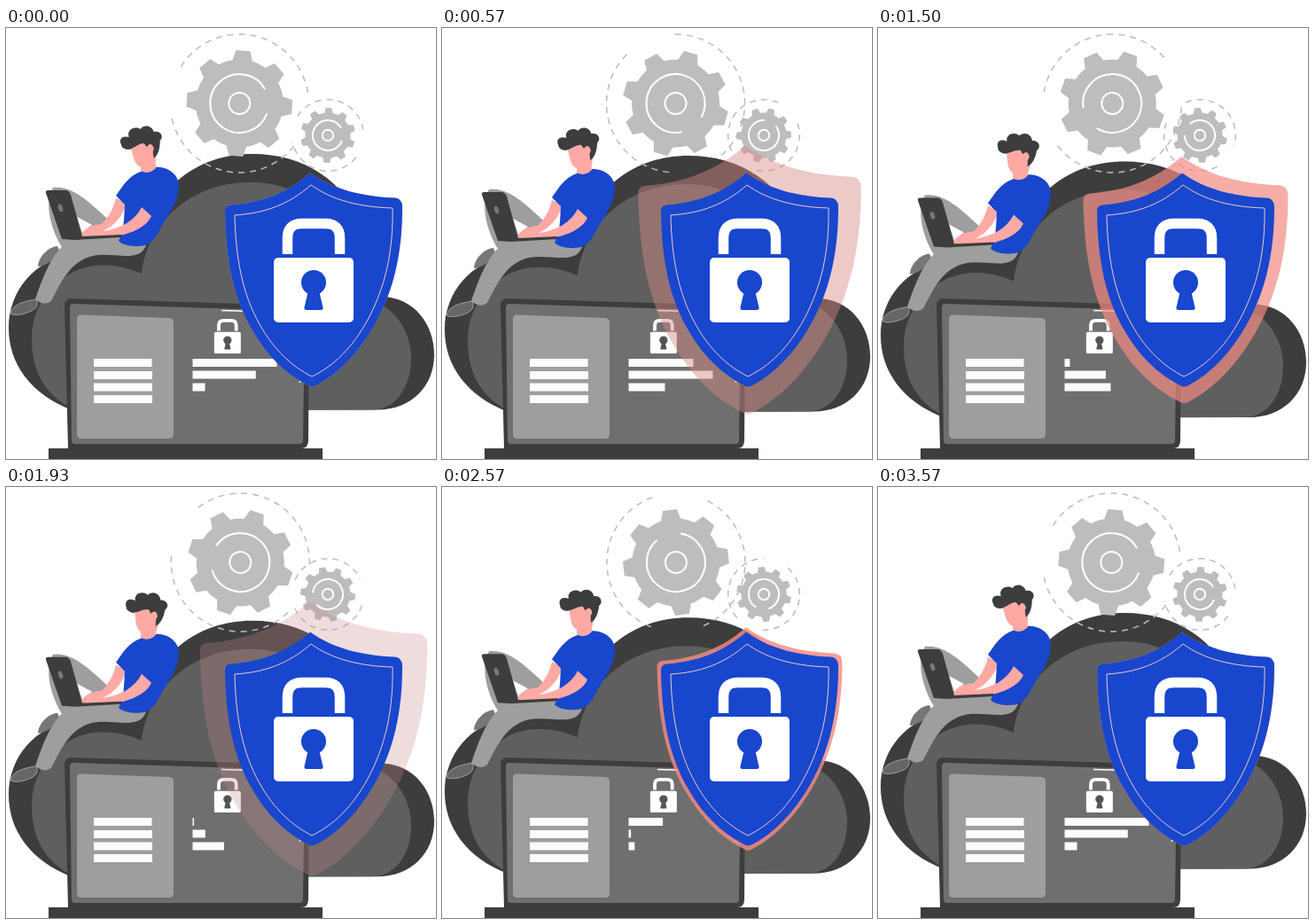
These frames come from a looping animation (485 px wide and 486 px high, 3.64 s). An HTML page:

```html
<!DOCTYPE html>
<html lang="en">
<head>
<meta charset="utf-8">
<title>Cloud security</title>
<style>
  html, body { margin: 0; width: 100%; height: 100%; overflow: hidden; background: #fff; }
  svg { display: block; width: 485px; height: 486px; }
  #gears path { vector-effect: non-scaling-stroke; }
</style>
</head>
<body>
<svg viewBox="0 0 485 486">
  <defs>
    <path id="shield" d="M343 163.500C369 182 401 190 438 191.500Q447 192 447 202C447 252 438 296 415 336C397 367 375 390 350 403Q345 406 340 402.500C315 390 294 369 278 341C255 302 248 258 247 208Q246 200 254 199.500C289 197 319 185 343 163.500Z"/>
    <g id="lock">
      <path d="M317.500 255V237Q317.500 220.500 334 220.500H360Q376.500 220.500 376.500 237V255" fill="none" stroke="#fff" stroke-width="11.500"/>
      <rect x="302" y="259" width="90" height="73" rx="5" fill="#fff"/>
      <circle cx="347" cy="287" r="14"/>
      <path d="M341 296H353L357.500 315Q358 318 355 318H339Q336 318 336.500 315Z"/>
    </g>
  </defs>

  <g id="cloud">
    <path fill="#3d3d3d" d="M75 431C27 413 3 378 3 338C3 296 33 261 75 255L130 246L152 244C168 180 215 142 278 142C336 142 382 172 403 225L425 303C460 304 483 334 483 368C483 405 456 430.500 419 430.500Z"/>
    <path fill="#5f5f5f" d="M78 431C42 414 29 385 29 350C29 307 62 272 101 268C124 266 138 271 153 277C160 220 207 174 276 174C336 174 378 210 402 306C437 309 457 342 457 372C457 407 438 430.500 413 430.500Z"/>
    <!-- seated figure -->
    <path fill="#9e9e9e" d="M53 180C78 177 100 203 120 220L100 232L63 247C50 226 43 196 53 180Z"/>
    <path fill="#fff" d="M80 213L97 222L86 231Z"/>
    <path fill="#777" d="M36 269C37 257 48 247 58 246L62 255C52 261 47 268 36 269Z"/>
    <path fill="#9e9e9e" d="M128 235L75 239C56 246 44 273 33 306Q43 314 51 308C62 287 72 263 98 257C122 252 150 266 158 245Z"/>
    <path fill="#666" stroke="#9e9e9e" d="M5 322C7 312 20 308 34 306Q38 314 29 319C20 323 11 325 5 322Z"/>
    <path fill="#ffa9a5" d="M124 192L135 197C134 207 128 216 118 224L106 231L84 235C87 226 96 222 108 221C117 212 121 203 124 192Z"/>
    <path fill="#1846cd" d="M152 162C168 152 189 157 194 172C198 190 186 206 177 221C169 235 165 246 149 246C138 246 131 244 127 240C134 228 133 211 134 199L124 189C131 179 139 166 152 162Z"/>
    <path fill="#ffa9a5" d="M153 202L164 212C160 222 147 229 133 233L103 237L85 234Q95 227 110 229C129 226 145 218 153 202Z"/>
    <path fill="#3d3d3d" d="M45 186Q44 183 48 183H67Q71 183 73 188L86 235L130 233V236L78 239L63 238Z"/>
    <ellipse cx="61.500" cy="203" rx="2.500" ry="4.500" fill="#777" transform="rotate(-18 61.500 203)"/>
    <path fill="#ffa9a5" d="M152 148H168L169 158Q161 166 152 161Z"/>
    <g id="head">
      <path fill="#ffa9a5" d="M140 136L158 127L169 137L168 153L153 157Q147 156 144 149Z"/>
      <path fill="#3d3d3d" d="M129 131C126 124 132 121 138 123C135 115 144 110 151 114C155 108 164 110 166 117C173 115 178 122 173 127C173 136 171 143 166 147L165 140Q167 131 161 131L158 134L155 130C149 130 145 135 138 137Q130 137 129 131Z"/>
      <circle cx="163" cy="136" r="3" fill="#ffa9a5"/>
    </g>
  </g>

  <g id="gears"></g>

  <!-- laptop -->
  <path fill="#3d3d3d" d="M66 313Q66 305 74 305L334 313Q342 313 342 321L341 465Q341 474 333 474H70Z"/>
  <path fill="#6f6f6f" d="M72 315Q72 311 76 311L332 319Q337 319 337 324L335 465Q335 469 331 469H78Q74 469 74 465Z"/>
  <path fill="#9e9e9e" d="M80 328Q80 323 85 323.500L184 327Q189 327.500 189 332V458Q189 463 184 463H85Q80 463 80 458Z"/>
  <path fill="#3d3d3d" d="M48 474H357V486H48Z"/>
  <path stroke="#fff" stroke-width="1.500" d="M243 318.500L280 319.500M331.500 393V400"/>
  <use href="#lock" fill="#555" transform="translate(134.300 256.500) scale(.333)"/>
  <g fill="#fbfdfb">
    <path d="M99 373H164.500V382H99ZM99 387H165V396H99ZM99 400.500H165V409.500H99ZM99 414H165V423H99Z"/>
    <rect class="bar" x="210.500" y="373" height="9"/>
    <rect class="bar" x="210.500" y="386.500" height="9"/>
    <rect class="bar" x="210.500" y="400.500" height="9"/>
  </g>

  <use id="pulse" href="#shield"/>
  <use href="#shield" fill="#1846cd"/>
  <path fill="none" stroke="#efc8cb" d="M344 177C369 195 401 202 436 203C437 251 428 292 408 329C391 360 370 381 345 393C323 382 302 363 286 334C266 299 259 257 258 211C292 209 319 199 344 177Z"/>
  <use href="#lock" fill="#1846cd"/>
</svg>
<script>
const LOOP = 3640, STEP = 71.4, STEPS = 50;
const $ = s => document.querySelector(s);
const bars = [...document.querySelectorAll('.bar')];
const barMax = [95, 95, 56];

const polar = (r, deg) => {
  const a = deg * Math.PI / 180;
  return `${(r * Math.cos(a)).toFixed(2)} ${(r * Math.sin(a)).toFixed(2)}`;
};
const arc = (r, from, to) =>
  `M${polar(r, from)}A${r} ${r} 0 ${to - from > 180 ? 1 : 0} 1 ${polar(r, to)}`;

function gearMarkup(count, first) {
  const pitch = 360 / count, base = pitch * .35, tip = pitch * .17;
  let teeth = '';
  for (let i = 0; i < count; i++) {
    const a = first + i * pitch;
    teeth += `M${polar(46, a - base)}L${polar(60, a - tip)}L${polar(60, a + tip)}L${polar(46, a + base)}Z`;
  }
  return `<g><circle r="49.500" fill="#bdbdbd"/><path d="${teeth}" fill="#bdbdbd"/>
    <g fill="none" stroke="#fff" stroke-width="2"><path d="${arc(12, 0, 180)}${arc(12, 180, 360)}"/><path d="${arc(33, 20, 331)}"/></g>
    <path d="${arc(78, 38, 169)}${arc(78, 212, 351)}" fill="none" stroke="#bdbdbd" stroke-width="1.500" stroke-dasharray="7 6"/></g>`;
}
$('#gears').innerHTML = gearMarkup(8, 4) + gearMarkup(10, 20);
const [bigGear, smallGear] = $('#gears').children;

// Eased progress of cubic-bezier(.35, 0, 0, 1)
function ease(x) {
  let lo = 0, hi = 1, s = .5;
  for (let i = 0; i < 20; i++) {
    s = (lo + hi) / 2;
    if (1.05 * s * (1 - s) ** 2 + s ** 3 < x) lo = s; else hi = s;
  }
  return s * s * (3 - 2 * s);
}
const wave = u => (1 + Math.cos(2 * Math.PI * u)) / 2;

function draw(now) {
  const step = Math.min(STEPS, Math.floor((now % LOOP + 3) / STEP));
  const u = step / STEPS % 1;
  const sway = 1 - wave(u);

  $('#cloud').setAttribute('transform', `translate(0 ${9 * sway})`);
  $('#head').setAttribute('transform', `translate(.7 0) rotate(${11 * sway} 161 158)`);
  bigGear.setAttribute('transform', `translate(${263.3 + sway} 85) rotate(${360 * u})`);
  smallGear.setAttribute('transform', `translate(363 121) scale(.517) rotate(${-360 * u})`);
  bars.forEach((bar, i) => bar.setAttribute('width', barMax[i] * wave(u - i / 6)));

  const p = 3 * u % 1;
  const pulse = $('#pulse');
  pulse.setAttribute('transform', `translate(347 284) scale(${1 + .302 * ease(p)}) translate(-347 -284)`);
  pulse.setAttribute('fill', `rgb(${Math.min(246, 275 - 128 * p)},138,132)`);
  pulse.setAttribute('opacity', Math.max(0, 1 - 1.15 * p));
  requestAnimationFrame(() => draw(performance.now()));
}
draw(performance.now());
</script>
</body>
</html>
```
